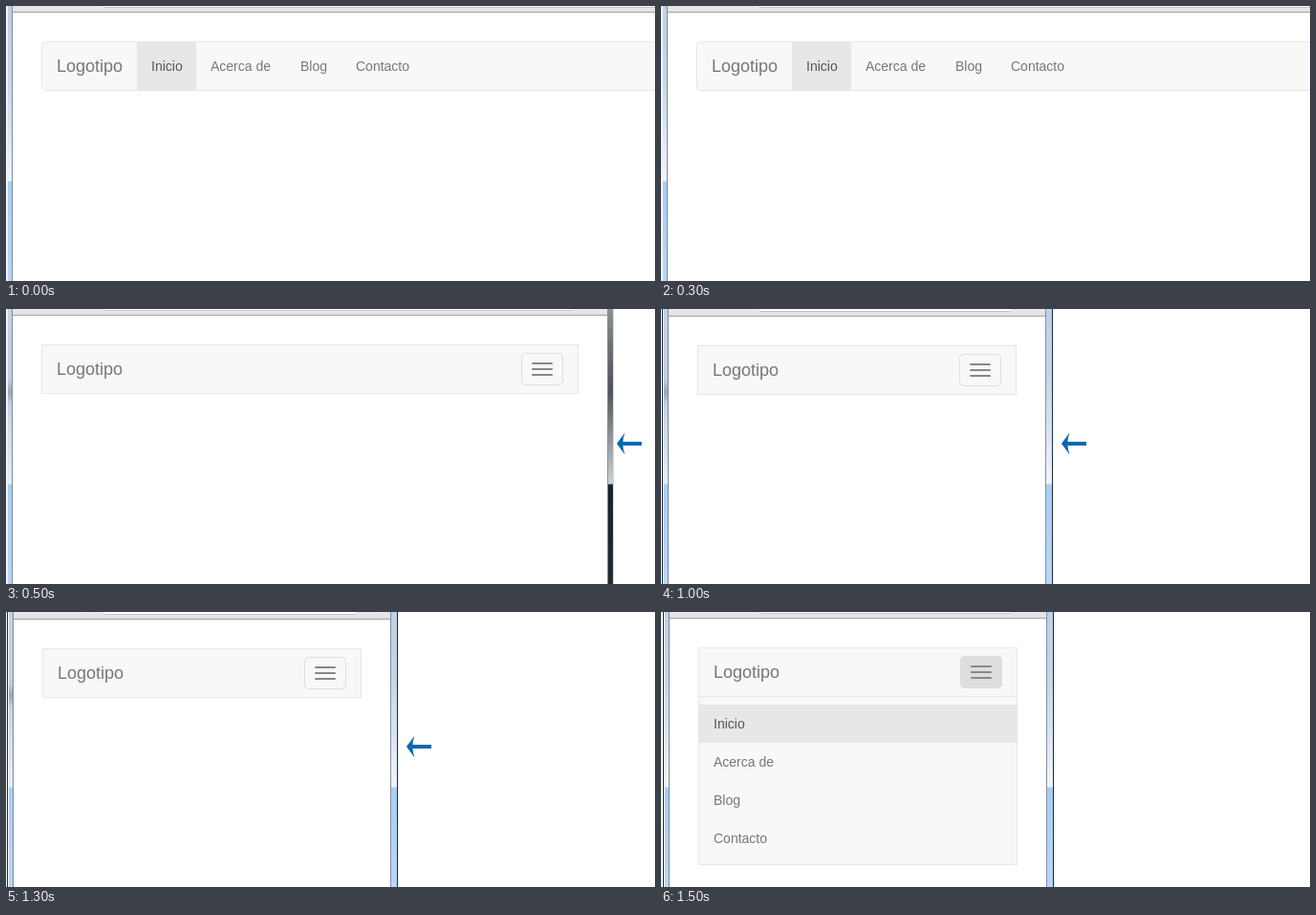
These frames come from a looping animation (679x288 px, 2 s). An HTML page:

```html
<!DOCTYPE html>
<html lang="es">
<head>
<meta charset="utf-8">
<title>Menú adaptable</title>
<style>
  html, body { margin: 0; width: 100%; height: 100%; overflow: hidden; background: #fff; }
  svg { display: block; width: 679px; height: 288px; }
  text { font: 14px "Liberation Sans", Arial, sans-serif; fill: #777; }
  .brand { font-size: 18px; }
  .active { fill: #555; }
</style>
</head>
<body>
<svg id="stage" viewBox="0 0 679 288"></svg>
<script>
const stage = document.getElementById('stage');
const items = ['Inicio', 'Acerca de', 'Blog', 'Contacto'];
const tabX = [115, 177, 271, 329];

const rect = (x, y, w, h, fill, extra = '') =>
  `<rect x="${x}" y="${y}" width="${w}" height="${h}" fill="${fill}" ${extra}/>`;
const box = (x, y, w, h, fill, stroke, r = 0) =>
  rect(x + .5, y + .5, w - 1, h - 1, fill, `stroke="${stroke}" rx="${r}"`);
const label = (x, y, text, name = '') => `<text x="${x}" y="${y}" class="${name}">${text}</text>`;

const gradient = (id, stops) =>
  `<linearGradient id="${id}" gradientUnits="userSpaceOnUse" x1="0" y1="0" x2="0" y2="288">` +
  stops.map(([y, color]) => `<stop offset="${y / 288}" stop-color="${color}"/>`).join('') +
  '</linearGradient>';

const defs = '<defs>' +
  gradient('bar', [[0, '#e9e9e9'], [6, '#e2e2e2']]) +
  gradient('glass', [[0, '#bdd0e8'], [70, '#c5d5e8'], [120, '#d5e2f0'], [183, '#f0f5fb'],
    [184, '#a9cdf3'], [288, '#b9d6f5']]) +
  gradient('smoky', [[0, '#c3d2e4'], [75, '#c0cfe0'], [87, '#96a5b8'], [100, '#c3d3e5'],
    [183, '#e6eef7'], [184, '#a9cdf3'], [288, '#b9d6f5']]) +
  gradient('dark', [[0, '#8d9095'], [40, '#6d7176'], [85, '#4e5359'], [130, '#8b8e92'],
    [183, '#cfd1d3'], [184, '#1a232b'], [288, '#222c35']]) +
  '</defs>';

function browser({ x, y, right, glass, edge, fieldEnd, rightGlass, rightEdge }) {
  const width = right - x;
  let out = rect(x, 0, 6, 288, `url(#${glass})`) +
    rect(x, 0, 1, 288, edge) + rect(x + 1, 0, 1, 288, '#eef5fc') +
    rect(x + 6, 0, width - 6, 6 + y, 'url(#bar)') +
    rect(x + 102, 0, fieldEnd - x - 102, 1 + y, '#fff') +
    rect(x + 102, 1 + y, fieldEnd - x - 102, 1, '#c4c4c4') +
    rect(x + 6, 6 + y, width - 6, 1, '#a3a3a3') +
    rect(x + 6, 0, 1, 288, '#7f8c99');
  if (rightGlass) {
    out += rect(right, 0, rightEdge - right, 288, `url(#${rightGlass})`) +
      rect(right - 1, 0, 1, 288, '#8793a0') +
      rect(rightEdge, 0, 1, 288, rightGlass === 'dark' ? '#d5d7d9' : '#1d2a36');
  }
  return out;
}

function navbar({ x, y, navEnd, open }) {
  const left = x + 37, top = y + 37;
  const brand = label(left + 16, top + 32, 'Logotipo', 'brand');
  if (!navEnd) {
    return box(left, top, 700, 52, '#f8f8f8', '#e7e7e7', 4) + brand +
      rect(left + 100, top + 1, 62, 50, '#e7e7e7') +
      items.map((t, i) => label(left + tabX[i], top + 31, t, i ? '' : 'active')).join('');
  }
  const width = navEnd - left, button = navEnd - 60;
  let out = box(left, top, width, open ? 228 : 52, '#f8f8f8', '#e7e7e7') + brand +
    box(button, top + 9, 44, 34, open ? '#ddd' : '#f8f8f8', '#ddd', 4);
  for (let i = 0; i < 3; i++) out += rect(button + 11, top + 19 + i * 6, 22, 2, '#888', 'rx="1"');
  if (open) {
    out += rect(left, top + 51, width, 1, '#e7e7e7') +
      rect(left + 1, top + 60, width - 2, 40, '#e7e7e7') +
      items.map((t, i) => label(left + 16, top + 85 + i * 40, t, i ? '' : 'active')).join('');
  }
  return out;
}

const arrow = x => `<path transform="translate(${x} 141)" fill="#0868ae"
  d="M0 0L8.5-11.5Q6.5-6 6.5-2H26V2H6.5Q6.5 6 8.5 11.5Z"/>`;

const narrow = { glass: 'glass', edge: '#1d2a36', rightGlass: 'glass' };
const scenes = [
  { x: 0, y: 0, right: 679, glass: 'glass', edge: '#f4f8fc', fieldEnd: 679 },
  { x: 0, y: 0, right: 630, glass: 'smoky', edge: '#f4f8fc', fieldEnd: 593,
    rightGlass: 'dark', rightEdge: 635, navEnd: 599, arrowX: 639 },
  { ...narrow, x: 1, y: 1, right: 403, glass: 'smoky', fieldEnd: 366, rightEdge: 409,
    navEnd: 372, arrowX: 419 },
  { ...narrow, x: 2, y: 0, right: 404, fieldEnd: 367, rightEdge: 410, navEnd: 373, open: true }
];

stage.innerHTML = defs + scenes.map(s =>
  `<g>${browser(s)}${navbar(s)}${s.arrowX ? arrow(s.arrowX) : ''}</g>`).join('');
const groups = stage.querySelectorAll('g');

const start = performance.now();
function draw(now) {
  const current = Math.floor(Math.max(0, now - start) % 2000 / 500);
  groups.forEach((g, i) => g.setAttribute('visibility', i === current ? 'visible' : 'hidden'));
  requestAnimationFrame(draw);
}
draw(start);
</script>
</body>
</html>
```
